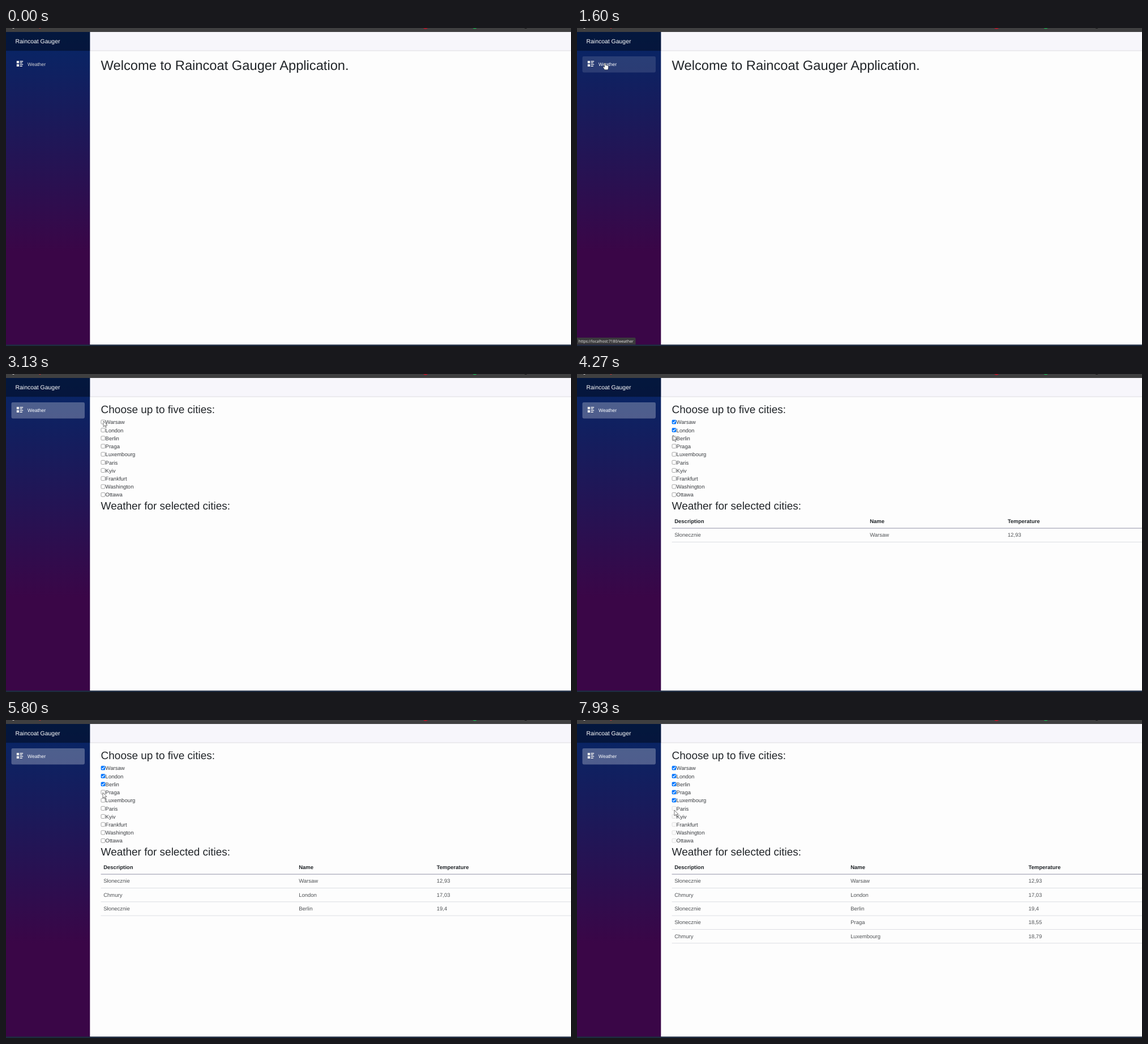
An HTML page for the animation above (8 s loop, 998 px wide and 561 px high).

```html
<!DOCTYPE html>
<html lang="en">
<head>
<meta charset="utf-8">
<title>Raincoat Gauger</title>
<style>
html, body { margin: 0; width: 100%; height: 100%; overflow: hidden; background: #fdfdfd; }
svg { display: block; width: 998px; height: 561px; }
text { font-family: "Liberation Sans", Arial, sans-serif; font-size: 9.5px; fill: #3b3e42; text-rendering: geometricPrecision; }
.h1 { font-size: 23.7px; fill: #212529; }
.h3 { font-size: 18.98px; fill: #212529; }
.brand { font-size: 10.44px; fill: #fff; }
.nav { font-size: 8.54px; fill: #d7d7d7; }
.status { font: 6.76px "Open Sans", sans-serif; fill: #f0f0f0; }
.th { font-weight: bold; fill: #212529; }
.td { fill: #505356; }
.box { fill: #fff; stroke: #767676; stroke-width: .65; }
.box.off { fill: #fafafa; stroke: #d0d0d0; }
.box.on { fill: #0075ff; stroke: #0075ff; }
.tick { fill: none; stroke: #fff; stroke-width: 1.2; }
.pointer { fill: #fff; stroke: #222; stroke-width: .6; stroke-linejoin: round; }
</style>
</head>
<body>
<svg viewBox="0 0 998 561">
  <defs>
    <linearGradient id="side" x1="0" y1="0" x2="0" y2="1">
      <stop offset="0" stop-color="#052767"/>
      <stop offset=".7" stop-color="#3a0647"/>
    </linearGradient>
  </defs>
  <rect width="998" height="561" fill="#fdfdfd"/>
  <rect x="148" y="7" width="850" height="33" fill="#f7f6fb"/>
  <rect x="148" y="39.7" width="850" height=".7" fill="#d0cfd4"/>
  <rect y="7" width="148.3" height="552" fill="url(#side)"/>
  <rect y="7" width="148.3" height="33.2" fill="#000" opacity=".4"/>
  <rect width="998" height="7" fill="#3f3f40"/>
  <g>
    <circle cx="13" cy="-1" r="2" fill="#ddd"/>
    <circle cx="60" cy="-1" r="2" fill="#c33"/>
    <circle cx="741" cy="-3" r="5" fill="#b5182b"/>
    <circle cx="828" cy="-3" r="4.5" fill="#1ba94c"/>
    <circle cx="918" cy="-2" r="3" fill="#111"/>
  </g>
  <rect y="558.5" width="998" height="2.5" fill="#1e2b40"/>
  <text class="brand" x="16.5" y="27.2">Raincoat Gauger</text>

  <rect id="highlight" x="9.5" y="50" width="129.5" height="28.4" rx="2.4" fill="#fff"/>
  <path transform="translate(18.8 58) scale(1.42)" fill="#eee"
    d="M0 0h3v3H0zM4 0h4v1H4zM4 2h3v1H4zM0 4h3v3H0zM4 4h4v1H4zM4 6h3v1H4z"/>
  <text id="link" class="nav" x="38" y="67">Weather</text>

  <text class="h1" x="167.6" y="73.5" data-to="1800">Welcome to Raincoat Gauger Application.</text>
  <g data-from="1800">
    <text class="h3" x="167.6" y="69">Choose up to five cities:</text>
    <g id="cities"></g>
    <text class="h3" x="167.6" y="238.6">Weather for selected cities:</text>
  </g>
  <g id="table"></g>

  <g data-from="1200" data-to="2560">
    <path d="M0 546.2H101.5a2 2 0 0 1 2 2V558.5H0Z" fill="#3b3b3d"/>
    <text class="status" x="2.8" y="554.8">https://localhost:7180/weather</text>
  </g>
  <g id="pointer" class="pointer">
    <path id="arrow" d="M0 0V10L2.3 7.8 3.9 11.4 5.4 10.7 3.9 7.3H7Z"/>
    <path id="hand" d="M-1 .8Q0-.6 1 .8V4.2Q2.2 3.6 2.8 4.6 4 4 4.6 5 6 4.8 6 6.2V9L5 12.2H-.6L-3.4 8Q-3.8 6.4-2.4 6.6L-1 7.8Z"/>
  </g>
</svg>
<script>
const LOOP = 8000;
const PAGE_OPEN = 1800;
const LEFT = 167.6;
const cities = ["Warsaw", "London", "Berlin", "Praga", "Luxembourg",
  "Paris", "Kyiv", "Frankfurt", "Washington", "Ottawa"];
// sky, temperature, click time, time the forecast arrives
const reports = [
  ["Słonecznie", "12,93", 3330, 3780],
  ["Chmury", "17,03", 3870, 4420],
  ["Słonecznie", "19,4", 4520, 5000],
  ["Słonecznie", "18,55", 6020, 6450],
  ["Chmury", "18,79", 6850, 7270]
];
const lastClick = reports[4][2];
const relayout = reports[4][3];
// time, x, y of the pointer tip
const path = [
  [550, 62, -14], [930, 47, 43], [1250, 49.5, 61.5], [2450, 49.5, 61.5],
  [3050, 172, 83], [3500, 172, 83], [3800, 171, 97], [3950, 171, 97],
  [4270, 169.5, 108], [4450, 170, 111], [5100, 170, 111], [5750, 171, 128],
  [6150, 171, 128], [6650, 172, 141], [7050, 172, 141], [7650, 172, 159]
];

const $ = id => document.getElementById(id);

function add(parent, tag, attrs, content = "") {
  const node = document.createElementNS("http://www.w3.org/2000/svg", tag);
  for (const key in attrs) node.setAttribute(key, attrs[key]);
  node.textContent = content;
  return parent.appendChild(node);
}

const boxes = cities.map((city, i) => {
  const y = 81 + i * 14.24;
  const box = add($("cities"), "rect", { class: "box", x: LEFT + .4, y: y + .2, width: 6.9, height: 6.9, rx: 1.2 });
  add($("cities"), "text", { x: 175.6, y: y + 7.3 }, city);
  if (reports[i]) {
    add($("cities"), "path", { class: "tick", d: `M169.2 ${y + 3.9}l1.6 1.6 3-3.8`, "data-from": reports[i][2] });
  }
  return box;
});

const columns = [[], []];

function addRow(cells, y, from, type) {
  const row = add($("table"), "g", { "data-from": from });
  cells.forEach((cell, i) => {
    const node = add(row, "text", { class: type, x: 172.2, y }, cell);
    if (i) columns[i - 1].push(node);
  });
  add(row, "rect", {
    x: LEFT, y: y + 8.6, width: 998 - LEFT, height: .9,
    fill: type === "th" ? "#85859c" : "#d9dbe0"
  });
}

addRow(["Description", "Name", "Temperature"], 263, reports[0][3], "th");
reports.forEach(([sky, temp, , ready], i) =>
  addRow([sky, cities[i], temp], 287.4 + i * 24.33, ready, "td"));

const timed = [...document.querySelectorAll("[data-from], [data-to]")].map(node => ({
  node, from: +(node.dataset.from || 0), to: +(node.dataset.to || LOOP)
}));

function pointerAt(t) {
  const next = path.findIndex(p => p[0] > t);
  if (next < 1) return (next ? path[path.length - 1] : path[0]).slice(1);
  const a = path[next - 1], b = path[next];
  const u = (t - a[0]) / (b[0] - a[0]);
  const k = u * u * (3 - 2 * u);
  return [a[1] + (b[1] - a[1]) * k, a[2] + (b[2] - a[2]) * k];
}

const show = (node, on) => node.style.display = on ? "" : "none";

function draw(t) {
  for (const { node, from, to } of timed) show(node, t >= from && t < to);

  const [x, y] = pointerAt(t);
  const hover = x < 139 && y > 50 && y < 78.4;
  const active = t >= PAGE_OPEN;
  $("pointer").setAttribute("transform", `translate(${x} ${y})`);
  show($("hand"), hover);
  show($("arrow"), !hover);
  $("highlight").setAttribute("opacity", hover ? .12 : active ? .27 : 0);
  $("link").style.fill = hover || active ? "#fff" : "";

  boxes.forEach((box, i) => {
    const checked = reports[i] && t >= reports[i][2];
    box.setAttribute("class", "box" + (checked ? " on" : t >= lastClick ? " off" : ""));
  });

  const lefts = t < relayout ? [517.2, 760.7] : [483.2, 797.4];
  columns.forEach((cells, i) => cells.forEach(cell => cell.setAttribute("x", lefts[i])));
}

const start = performance.now();
function tick() {
  draw((performance.now() - start) % LOOP);
  requestAnimationFrame(tick);
}
tick();
</script>
</body>
</html>
```
